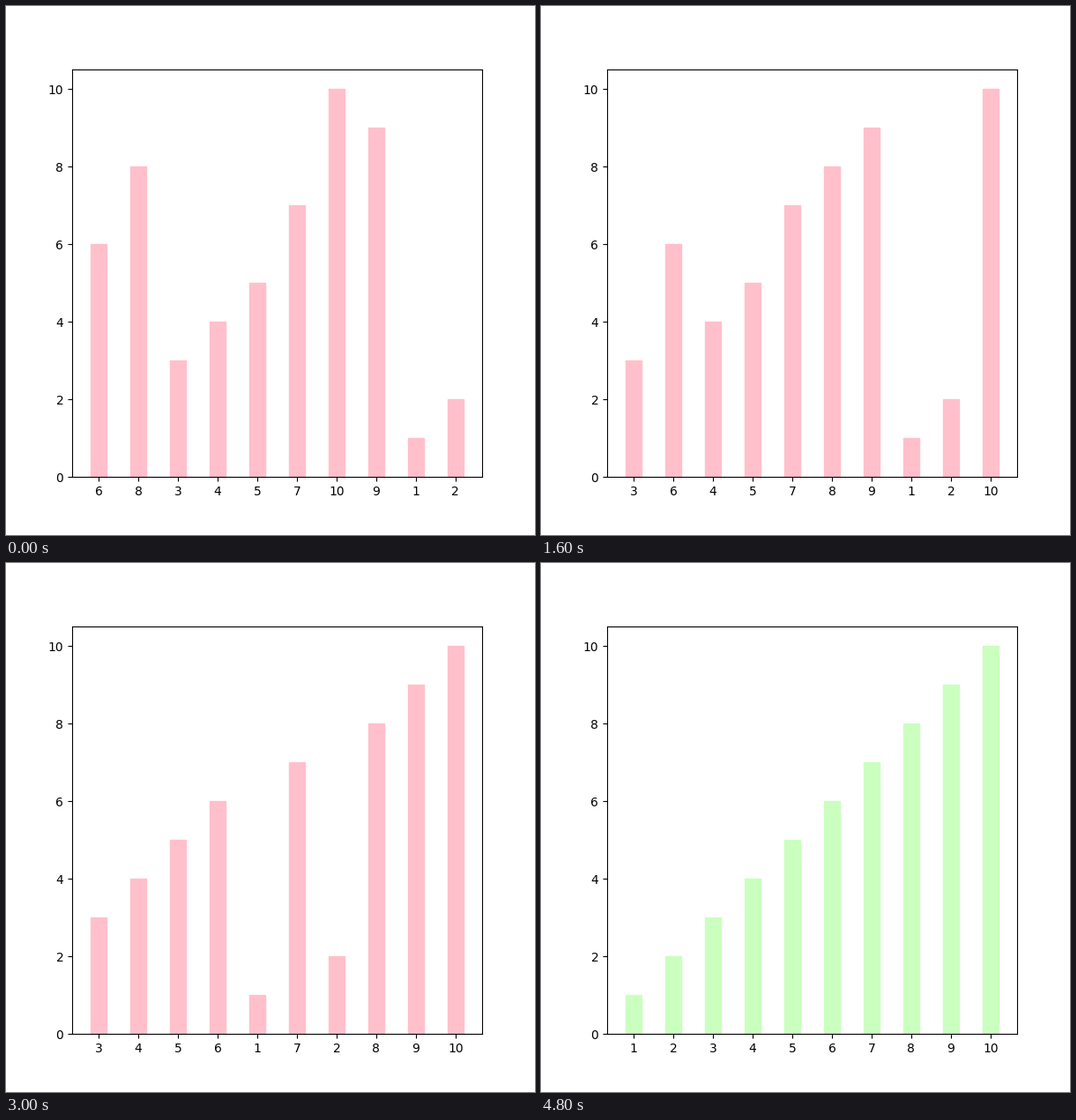
Recreate the animation shown at these times as a matplotlib script. Size 600 by 600 pixels, loop 6000 ms.

```python
import matplotlib.pyplot as plt
from matplotlib.animation import FuncAnimation

VALUES = [6, 8, 3, 4, 5, 7, 10, 9, 1, 2]
STEP_MS = 200
LOOP_MS = 6000
BUSY, DONE = "pink", "#caffbf"


def bubble_sort(values):
    """Yield the list at the start and after every swap."""
    items = list(values)
    yield items[:]
    for end in range(len(items) - 1, 0, -1):
        for i in range(end):
            if items[i] > items[i + 1]:
                items[i], items[i + 1] = items[i + 1], items[i]
                yield items[:]


states = list(bubble_sort(VALUES))
slots = range(len(VALUES))

fig, ax = plt.subplots(figsize=(6, 6), dpi=100)
bars = ax.bar(slots, VALUES, width=0.4, color=BUSY)
ax.set_ylim(0, max(VALUES) * 1.05)
ax.set_xticks(slots, [str(v) for v in VALUES])


def update(frame):
    step = min(frame, len(states) - 1)
    items = states[step]
    color = DONE if step == len(states) - 1 else BUSY
    for bar, value in zip(bars, items):
        bar.set_height(value)
        bar.set_color(color)
    ax.set_xticklabels([str(v) for v in items])
    return bars.patches


anim = FuncAnimation(fig, update, frames=LOOP_MS // STEP_MS, interval=STEP_MS,
                     repeat=True, repeat_delay=0, blit=False)
plt.show()
```
